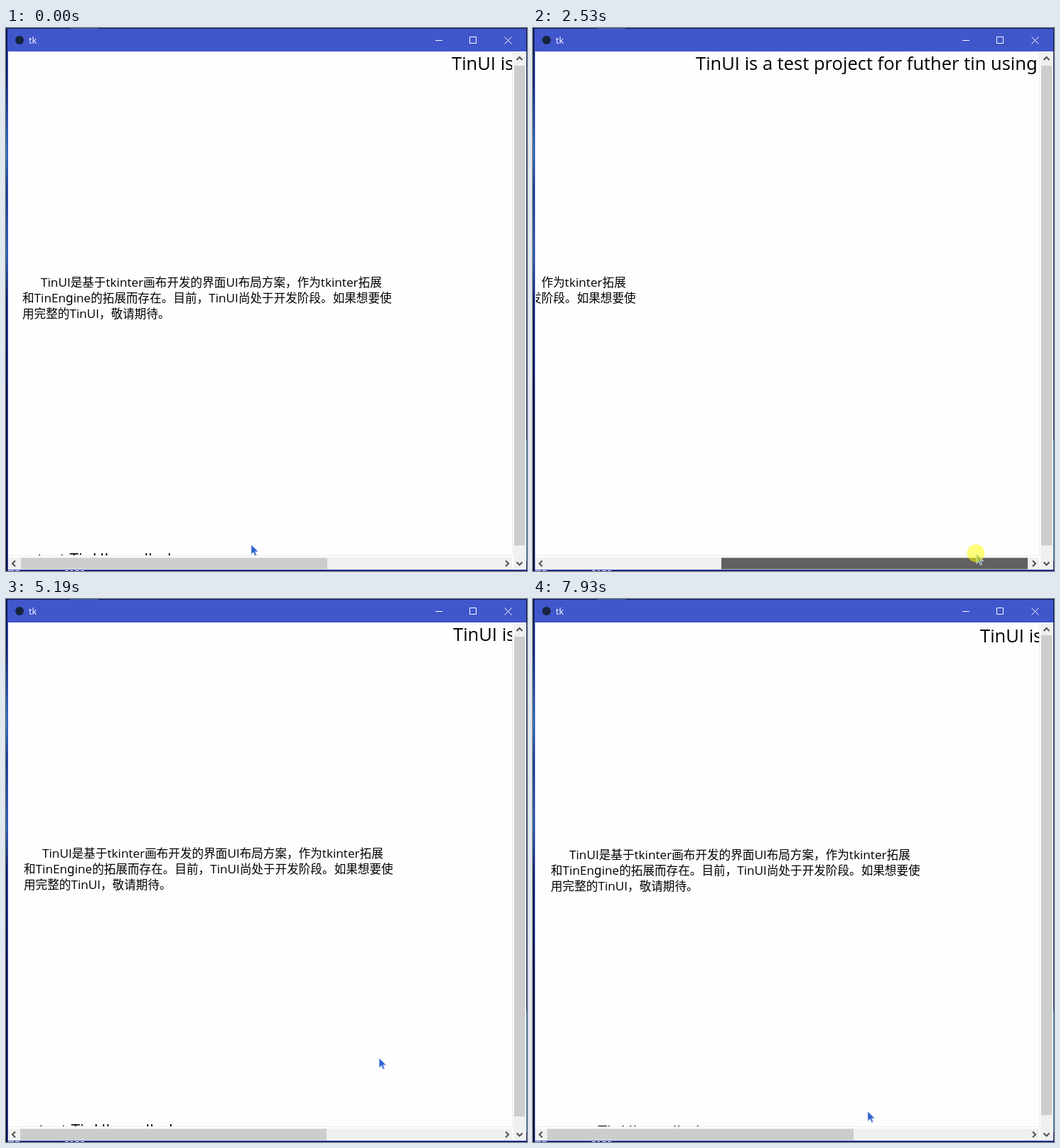
Animation, 733 px wide and 764 px high, one loop 8000 ms. Source, as an HTML page:

```html
<!DOCTYPE html>
<html lang="zh-CN">
<head>
<meta charset="utf-8">
<title>tk</title>
<style>
  html, body { margin: 0; width: 100%; height: 100%; overflow: hidden; background: #0a1650; }
  svg { display: block; width: 733px; height: 764px; }
  text { font-family: "Open Sans", "Noto Sans CJK SC", "Noto Sans CJK", sans-serif; white-space: pre; }
  .g { font-family: "Noto Sans", "Open Sans", sans-serif; }
  .arrows { fill: none; stroke: #505050; stroke-width: 2; }
  .buttons { fill: none; stroke: #fff; stroke-width: 1; }
</style>
</head>
<body>
<svg viewBox="0 0 733 764">
  <defs>
    <clipPath id="view"><rect x="4" y="35" width="708" height="707"/></clipPath>
    <linearGradient id="desk" x1="0" y1="0" x2="0" y2="1">
      <stop offset="0" stop-color="#0a1648"/>
      <stop offset=".1" stop-color="#0d2468"/>
      <stop offset=".23" stop-color="#2f78b8"/>
      <stop offset=".3" stop-color="#123a80"/>
      <stop offset=".42" stop-color="#2a66a8"/>
      <stop offset=".5" stop-color="#0c1c5c"/>
      <stop offset=".7" stop-color="#050a38"/>
      <stop offset="1" stop-color="#060a30"/>
    </linearGradient>
  </defs>

  <!-- desktop behind the window -->
  <rect width="733" height="764" fill="#0a1650"/>
  <rect width="2" height="764" fill="url(#desk)"/>
  <rect x="90" width="40" height="1" fill="#34508c"/>
  <rect x="732" y="580" width="1" height="170" fill="#1c62a4"/>
  <path d="M3 763.5h8m2 0h6m64 0h5m3 0h3m3 0h6m2 0h5" stroke="#dfe4f0"/>

  <!-- window -->
  <rect x="2" y="1" width="730" height="762" fill="#4056cb"/>
  <rect x="3" y="33" width="729" height="729" fill="#fefefe"/>
  <circle cx="19" cy="17" r="6" fill="#16243c"/>
  <text x="32" y="22" font-size="13" fill="#fff">tk</text>
  <path class="buttons" d="M604 17.5h10M652.5 12.5h9v9h-9zM701.5 12.5l10 10m0-10l-10 10"/>

  <g id="page" clip-path="url(#view)"><g id="content"></g></g>

  <!-- scrollbars -->
  <path d="M3 742.5h709M712.5 34v709" stroke="#ececec"/>
  <rect x="3" y="745" width="709" height="17" fill="#f0f0f0"/>
  <rect x="714" y="34" width="17" height="728" fill="#f0f0f0"/>
  <rect id="barX" y="745.5" width="431" height="16"/>
  <rect id="barY" x="715" width="15" height="675"/>
  <path class="arrows" d="M13 749.5l-4 4 4 4M703 749.5l4 4-4 4M718.5 45l4-4 4 4M718.5 751.5l4 4 4-4"/>

  <g id="pointer">
    <path id="arrow" d="M0 0V13.5L3.2 10.6 5.4 15.4 7.6 14.4 5.5 9.8H9.8Z" stroke-width="1"/>
    <circle id="halo" cx="-1" cy="-1" r="12.5" fill="#ff0" fill-opacity=".52"/>
  </g>
</svg>
<script>
const LOOP = 8000;
const $ = id => document.getElementById(id);

// first change, last change, number of changes
const bursts = [
  [70, 70, 1], [570, 630, 2], [1000, 1750, 11], [1830, 2530, 10],
  [3270, 4030, 10], [4100, 4790, 10], [4960, 5510, 8], [5660, 6000, 5],
  [6170, 6560, 6], [6900, 7430, 8], [7640, 7930, 5]
];
const ticks = [0];
for (const [from, to, n] of bursts)
  for (let k = 0; k < n; k++)
    ticks.push(n > 1 ? Math.floor((from + (to - from) * k / (n - 1)) / 10) * 10 : from);

// time, x, y of the pointer tip
const pointerKeys = [
  [0, 345, 727], [70, 345, 742], [570, 344, 744], [630, 344, 746],
  [1000, 346, 747], [1450, 393, 751], [1750, 446, 748], [2530, 624, 740],
  [3270, 616, 739], [4170, 429, 724], [4790, 300, 715],
  [4960, 330, 706], [5190, 525, 646], [5510, 704, 592],
  [5660, 707, 589], [6000, 722, 568], [6170, 722, 572], [6240, 722, 587],
  [6560, 722, 600], [6900, 722, 596], [7430, 722, 566],
  [7640, 680, 592], [7930, 471, 721]
];
// time, thumb position
const barXKeys = [[0, 21], [930, 21], [1450, 68], [1750, 122], [2376, 265], [3400, 265], [4170, 108], [4578, 19.8]];
const barYKeys = [[0, 53], [6165, 53], [6240, 70], [7050, 70], [7400, 51]];

function at(keys, t) {
  const i = keys.findIndex(k => k[0] > t);
  if (i < 0) return keys[keys.length - 1].slice(1);
  const a = keys[i - 1], b = keys[i];
  const p = (t - a[0]) / (b[0] - a[0]);
  return a.slice(1).map((v, j) => v + (b[j + 1] - v) * p);
}

// Latin runs get their own size; "g" takes the single-storey form
function label(x, y, size, str, latin = size) {
  const body = str.replace(/[A-Za-z ]+/g, run =>
    `<tspan font-size="${latin}">${run.replace(/g/g, '<tspan class="g">g</tspan>')}</tspan>`);
  return `<text x="${x}" y="${y}" font-size="${size}">${body}</text>`;
}

const lines = [
  [49, "TinUI是基于tkinter画布开发的界面UI布局方案，作为tkinter拓展"],
  [23, "和TinEngine的拓展而存在。目前，TinUI尚处于开发阶段。如果想要使"],
  [23, "用完整的TinUI，敬请期待。"]
];
$("content").innerHTML =
  label(627, 59, 25.55, "TinUI is a test project for futher tin using") +
  lines.map(([x, s], i) => label(x, 364 + 22 * i, 16.6, s, 17.2)).join("") +
  label(44, 755, 22.7, "test TinUI scrolled");

const barColor = held => held ? "#606060" : "#cdcdcd";

function render(time) {
  const t = ticks.filter(k => k <= time).pop();
  const [x, y] = at(pointerKeys, t);
  const [bx] = at(barXKeys, t);
  const [by] = at(barYKeys, t);
  const holdX = t >= 1000 && t < 4960;
  const holdY = t >= 6170 && t < 7640;
  const held = holdX || holdY;

  $("content").setAttribute("transform",
    `translate(${Math.round((21 - bx) * 1.63)} ${Math.round((53 - by) * 1.05)})`);
  $("barX").setAttribute("x", Math.round(bx));
  $("barX").setAttribute("fill", barColor(holdX));
  $("barY").setAttribute("y", Math.round(by));
  $("barY").setAttribute("fill", barColor(holdY));
  $("pointer").setAttribute("transform", `translate(${Math.round(x)} ${Math.round(y)})`);
  $("arrow").setAttribute("fill", held ? "#5583a6" : "#2c60d2");
  $("arrow").setAttribute("stroke", held ? "#d4dde4" : "#c3cfee");
  $("halo").setAttribute("visibility", held ? "visible" : "hidden");
}

const start = performance.now();
function frame() {
  render((performance.now() - start) % LOOP);
  requestAnimationFrame(frame);
}
frame();
</script>
</body>
</html>
```
